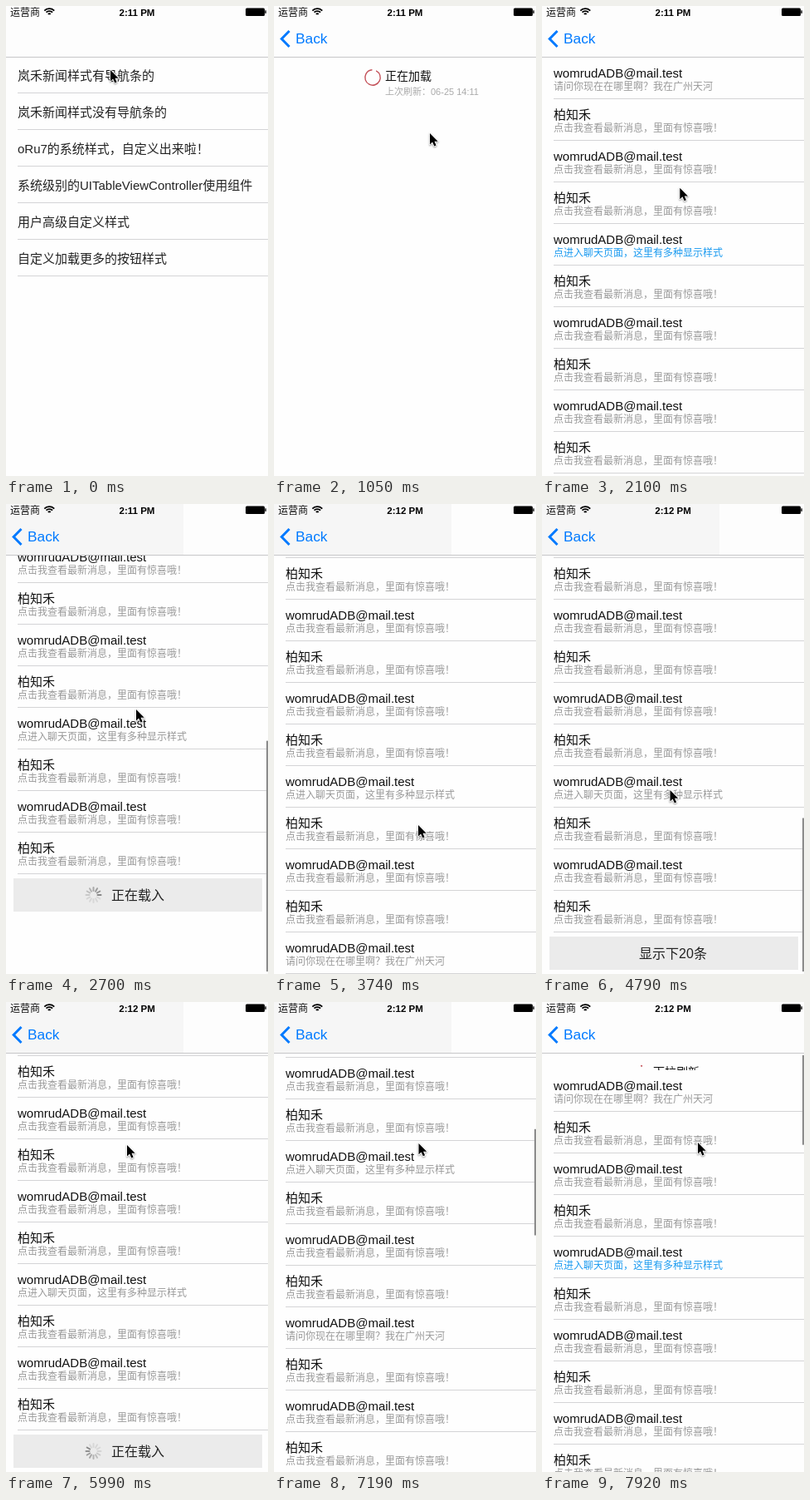
Write an HTML page with a canvas that moves like this. It is 316 px wide and 565 px high and loops after 8000 ms.

```html
<!DOCTYPE html>
<html lang="zh-CN">
<head>
<meta charset="utf-8">
<style>
  html, body { margin: 0; width: 100%; height: 100%; overflow: hidden; background: #fefefe; }
  canvas { display: block; width: 316px; height: 565px; }
</style>
</head>
<body>
<canvas id="stage"></canvas>
<script>
const W = 316, H = 565, NAV = 62, ROW = 50, MENU_ROW = 44, BATCH = 14;
const LOOP = 8000, HOLD = 150;
const FAMILY = '"Liberation Sans", "Noto Sans CJK SC", "Noto Sans CJK", sans-serif';
const PAPER = '#fefefe', LINE = '#d4d4d6', BLUE = '#007aff';

// Moments of the story, in ms
const TAP = 450, FIRST_DATA = 1800, SWIPE_1 = 2400, BOTTOM_1 = 2700, MORE_1 = 3740,
      BOTTOM_2 = 4340, BUTTON_TAP = 5240, MORE_2 = 6440, TOP_AGAIN = 7790, END = 7920;

const MENU = [
  '岚禾新闻样式有导航条的',
  '岚禾新闻样式没有导航条的',
  'oRu7的系统样式，自定义出来啦！',
  '系统级别的UITableViewController使用组件',
  '用户高级自定义样式',
  '自定义加载更多的按钮样式'
];
const SENDERS = ['womrudADB@mail.test', '柏知禾'];

// Resting points of the pointer
const POINTER = [
  { at: TAP, x: 126, y: 77 },
  { at: 1050, x: 188, y: 153 },
  { at: BOTTOM_1, x: 157, y: 247 },
  { at: MORE_1, x: 174, y: 386 },
  { at: BOTTOM_2, x: 159, y: 153 },
  { at: BUTTON_TAP, x: 150, y: 535 },
  { at: 5990, x: 146, y: 172 },
  { at: END, x: 188, y: 169 }
];

const canvas = document.getElementById('stage');
const ctx = canvas.getContext('2d');
const scale = window.devicePixelRatio || 1;
canvas.width = W * scale;
canvas.height = H * scale;

const clamp = v => Math.max(0, Math.min(1, v));
const ramp = (t, a, b) => clamp((t - a) / (b - a));
const smooth = f => f * f * (3 - 2 * f);
const easeOut = f => 1 - (1 - f) ** 2;
const mix = (a, b, f) => a + (b - a) * f;

function rect(x, y, w, h, color) {
  ctx.fillStyle = color;
  ctx.fillRect(x, y, w, h);
}

function text(str, x, y, size, color = '#111', align = 'left', weight = '') {
  ctx.font = `${weight} ${size}px ${FAMILY}`;
  ctx.fillStyle = color;
  ctx.textAlign = align;
  ctx.fillText(str, x, y);
}

function stroke(color, width, build, cap = 'butt') {
  ctx.beginPath();
  build();
  ctx.strokeStyle = color;
  ctx.lineWidth = width;
  ctx.lineCap = cap;
  ctx.stroke();
}

function shifted(x, y, draw) {
  ctx.save();
  ctx.translate(x, y);
  draw();
  ctx.restore();
}

function faded(alpha, draw) {
  ctx.save();
  ctx.globalAlpha = alpha;
  draw();
  ctx.restore();
}

// Overscroll: a quick pull up to the peak, then a springy return
const rubber = (t, peak, distance) =>
  distance * ramp(t, peak - HOLD, peak) * (1 - easeOut(ramp(t, peak, peak + 300)));

function listTop(t) {
  const batch = BATCH * ROW;
  const firstRun = NAV + batch + ROW - H;
  const top = NAV
    + 60 * (1 - easeOut(ramp(t, FIRST_DATA, FIRST_DATA + 300)))
    - firstRun * ramp(t, SWIPE_1, BOTTOM_1)
    - batch * smooth(ramp(t, MORE_1, BOTTOM_2))
    + (firstRun + batch) * smooth(ramp(t, MORE_2, TOP_AGAIN))
    - rubber(t, BOTTOM_1, 70) - rubber(t, BOTTOM_2, 41) + rubber(t, END, 20);
  return Math.round(top);
}

function pointerAt(t) {
  const next = POINTER.findIndex(p => p.at > t);
  if (next < 1) return next ? POINTER.at(-1) : POINTER[0];
  const a = POINTER[next - 1], b = POINTER[next];
  const f = smooth(ramp(t, a.at, b.at));
  return { x: mix(a.x, b.x, f), y: mix(a.y, b.y, f) };
}

function noteFor(index) {
  if (index === 0) return '请问你现在在哪里啊？我在广州天河';
  if (index % 6 === 4) return '点进入聊天页面，这里有多种显示样式';
  return '点击我查看最新消息，里面有惊喜哦！';
}

function drawMenu(pressed) {
  MENU.forEach((label, i) => {
    const y = NAV - 1 + MENU_ROW * i;
    if (pressed && i === 0) rect(0, y, W, MENU_ROW, '#d9d9d9');
    text(label, 14, y + 28, 15, '#222');
    rect(14, y + MENU_ROW - 1, W - 14, 1, LINE);
  });
}

function drawRefreshHeader(t, loading, pull) {
  const start = loading ? -1.1 + (t - 1050) / HOLD * 0.9 : -Math.PI / 2;
  const sweep = 5.75 * (loading ? 1 : ramp(pull, 18, 68));
  stroke('#c4525a', 1.4, () => ctx.arc(119, 86, 9.2, start, start + sweep));
  text(loading ? '正在加载' : '下拉刷新', 134, 89, 14);
  text('上次刷新：06-25 14:11', 134, 107, 11, '#aaa');
}

function drawSpinner(x, y, t) {
  const lead = Math.floor(t / 75);
  for (let i = 0; i < 12; i++) {
    const a = i * Math.PI / 6;
    const shade = Math.min(215, 135 + (lead - i + 12) % 12 * 11);
    stroke(`rgb(${shade},${shade},${shade})`, 2, () => {
      ctx.moveTo(x + Math.cos(a) * 5, y + Math.sin(a) * 5);
      ctx.lineTo(x + Math.cos(a) * 9, y + Math.sin(a) * 9);
    }, 'round');
  }
}

function drawFooter(y, t) {
  rect(0, y, W, ROW, PAPER);
  rect(9, y + 5, 300, 40, '#ebebeb');
  if (t >= MORE_1 && t < BUTTON_TAP) {
    text('显示下20条', 158, y + 31, 16, '#222', 'center');
  } else {
    drawSpinner(105.5, y + 25, t);
    text('正在载入', 127, y + 31, 16, '#222');
  }
}

function scrollBarAlpha(t) {
  const shown = (from, to) => Math.min(ramp(t, from, from + HOLD), 1 - ramp(t, to, to + 300));
  return Math.max(shown(SWIPE_1, 3000), shown(MORE_1, 4790), shown(MORE_2, LOOP));
}

function drawScrollBar(top, count, alpha) {
  const view = H - NAV, content = (count + 1) * ROW;
  const scroll = NAV - top, limit = content - view;
  const over = Math.max(0, -scroll, scroll - limit);
  const height = view * view / content + 10 - over;
  const y = mix(64, H - 3 - height, clamp(scroll / limit));
  faded(alpha, () => rect(314, y, 2, height, '#8b8b8b'));
}

function drawChats(t) {
  rect(0, NAV, W, H - NAV, PAPER);
  const top = listTop(t);
  if (top > NAV) drawRefreshHeader(t, t < SWIPE_1, top - NAV);
  if (t < FIRST_DATA) return;

  const count = BATCH * (1 + (t >= MORE_1) + (t >= MORE_2));
  for (let i = 0; i < count; i++) {
    const y = top + i * ROW;
    if (y < -ROW || y > H) continue;
    rect(0, y, W, ROW, PAPER);
    text(SENDERS[i % 2], 14, y + 24, 15);
    text(noteFor(i % BATCH), 14, y + 39, 12, i === 4 ? '#1c9bf0' : '#999');
    rect(14, y + ROW - 1, W - 14, 1, LINE);
  }
  drawFooter(top + count * ROW, t);
  drawScrollBar(top, count, scrollBarAlpha(t));
}

function drawBack(progress) {
  stroke(BLUE, 3, () => {
    ctx.moveTo(18.5, 30);
    ctx.lineTo(9.2, 39.5);
    ctx.lineTo(18.5, 49);
  });
  text('Back', 26 + (1 - progress) * 60, 45, 17.3, BLUE);
}

function drawStatus(clock) {
  text('运营商', 5, 11.5, 12);
  text(clock, 158, 11.5, 11.5, '#000', 'center', 'bold');
  for (const radius of [8.2, 5.2, 2]) {
    stroke('#000', 1.8, () => ctx.arc(52.3, 11.3, radius, -Math.PI * 0.76, -Math.PI * 0.24));
  }
  ctx.fillStyle = '#000';
  ctx.beginPath();
  ctx.roundRect(289, 2.5, 23, 9.5, 1.5);
  ctx.fill();
  rect(312.4, 5.3, 1.4, 3.6, '#000');
}

function drawNav(t, progress) {
  rect(0, 0, W, NAV, '#fdfdfd');
  if (t > SWIPE_1 && t < 7340) rect(0, 0, 214, NAV, '#f6f6f6');
  rect(0, NAV - 1, W, 1, '#c6c6c8');
  faded(progress, () => drawBack(progress));
  drawStatus(t < 3290 ? '2:11 PM' : '2:12 PM');
}

const arrow = new Path2D('M0 0V13.4L3.1 10.6L5.3 15.4L7.6 14.4L5.5 9.7H9.7Z');

function drawPointer({ x, y }) {
  shifted(x, y, () => {
    ctx.shadowColor = 'rgba(0,0,0,.4)';
    ctx.shadowBlur = 2 * scale;
    ctx.shadowOffsetY = scale;
    ctx.lineWidth = 1.8;
    ctx.lineJoin = 'round';
    ctx.strokeStyle = '#fff';
    ctx.stroke(arrow);
    ctx.shadowColor = 'transparent';
    ctx.fillStyle = '#000';
    ctx.fill(arrow);
  });
}

// Each pose is held for a moment; the rhythm restarts once at 3590 ms.
function heldTime(t) {
  if (t < TAP) return 0;
  if (t >= END) return END;
  const base = t < 3590 ? TAP : 3590;
  return base + Math.floor((t - base) / HOLD) * HOLD;
}

function render(now) {
  const t = heldTime(now % LOOP);
  const push = easeOut(ramp(t, TAP, 900));
  ctx.setTransform(scale, 0, 0, scale, 0, 0);
  rect(0, 0, W, H, PAPER);
  shifted(-W * 0.3 * push, 0, () => drawMenu(t >= TAP));
  shifted(W * (1 - push), 0, () => drawChats(t));
  drawNav(t, push);
  drawPointer(pointerAt(t));
}

const origin = performance.now();
function loop() {
  render(performance.now() - origin);
  requestAnimationFrame(loop);
}
loop();
</script>
</body>
</html>
```
